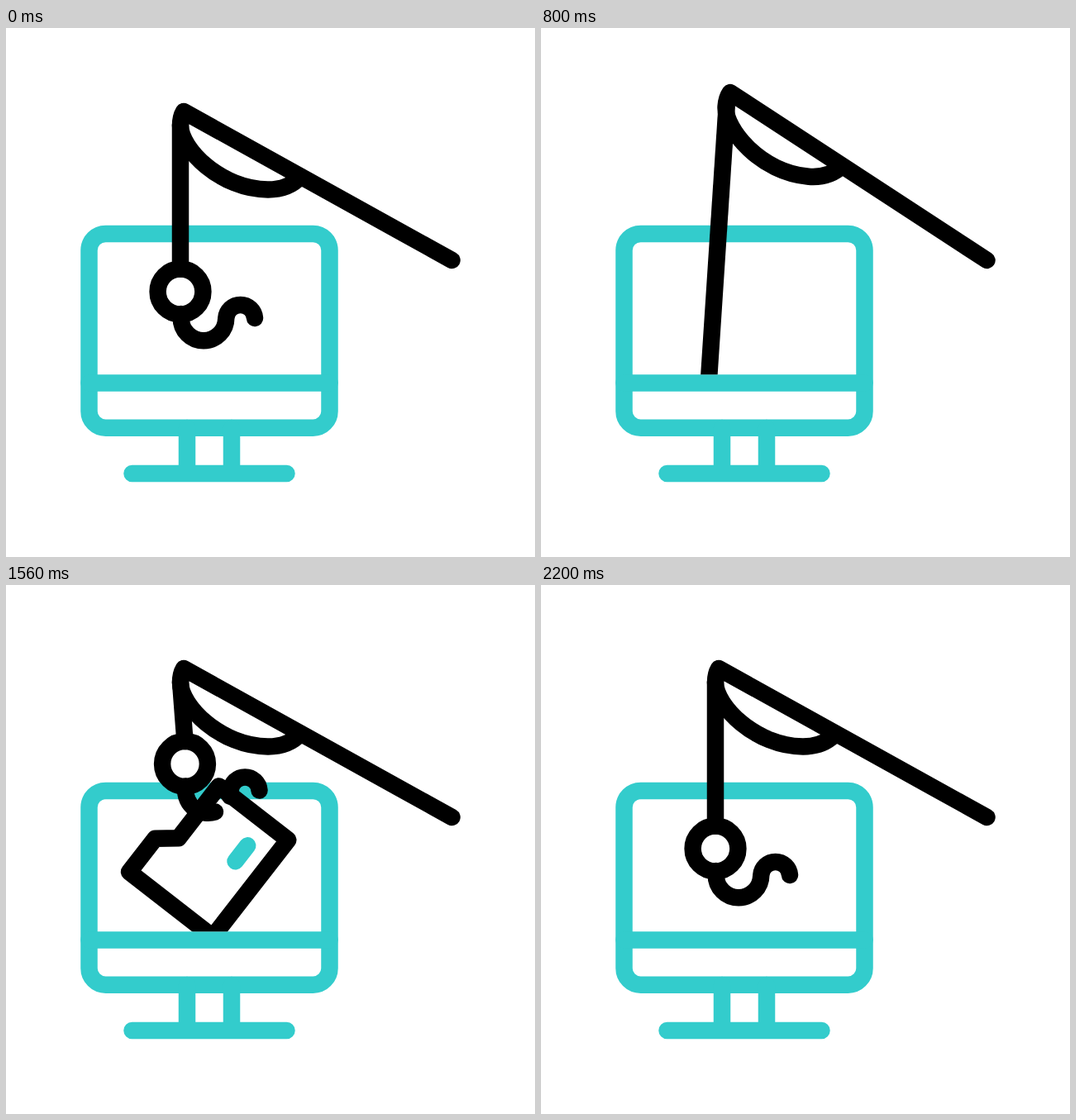
An HTML page for the animation above (2400 ms loop, 640 by 640 pixels).

```html
<!DOCTYPE html>
<html lang="en">
<head>
<meta charset="utf-8">
<title>Fishing rod and screen</title>
<style>
  html, body { margin: 0; width: 100%; height: 100%; overflow: hidden; background: #fff; }
  svg { display: block; width: 100vw; height: 100vh; }
  g { fill: none; stroke: #000; stroke-width: 20.5; stroke-linecap: round; stroke-linejoin: round; }
  .teal { stroke: #3cc; }
</style>
</head>
<body>
<svg viewBox="0 0 640 640">
  <clipPath id="water"><path d="M0 0H640V419.3H0Z"/></clipPath>
  <g class="teal">
    <rect x="100.5" y="249" width="291" height="234.7" rx="20"/>
    <path d="M100.5 429.5H391.5M219 484V539M273 484V539M152.5 539H339.5"/>
  </g>
  <g clip-path="url(#water)">
    <path id="line"/>
    <g id="card">
      <path d="M0 0H106V148.5H-22V97.5L0 79.5Z"/>
      <path class="teal" d="M71.5 35.5V59.5"/>
    </g>
    <g id="hook">
      <circle r="27.4"/>
      <path id="barb" d="M.7 27V32A27.3 27.3 0 0 0 55.3 32A17.4 17.4 0 0 1 90 32"/>
      <path id="pierced" d="M.7 27V32A27.3 27.3 0 0 0 36.4 58M54.4 39A27.3 27.3 0 0 0 55.3 32A17.4 17.4 0 0 1 90 32"/>
    </g>
  </g>
  <g id="rod">
    <path d="M539.5 281L215 101C212 106 211 112 211 118C211 146 260 195.5 317 195.5C334 195.5 347 190 356 180"/>
  </g>
</svg>
<script>
const LOOP = 2400, STEP = 20, RAD = Math.PI / 180;
const CATCH = 900, RELEASE = 1860, END = 2200;
const el = id => document.getElementById(id);
const place = (id, transform) => el(id).setAttribute('transform', transform);
const show = (id, on) => el(id).style.display = on ? '' : 'none';

// Eased progress from 0 to 1 between two times.
function phase(t, from, to) {
  const x = Math.min(1, Math.max(0, (t - from) / (to - from)));
  return (1 - Math.cos(Math.PI * x)) / 2;
}

function turn(x, y, deg) {
  const c = Math.cos(deg * RAD), s = Math.sin(deg * RAD);
  return [x * c - y * s, x * s + y * c];
}

function draw(t) {
  const dip = phase(t, 200, 600), drift = phase(t, 600, CATCH);
  const raise = phase(t, CATCH, 1300), sway = phase(t, 1300, 1700);
  const sink = phase(t, 1700, END);

  const lift = 4.35 * (phase(t, 200, CATCH) - raise);
  place('rod', `rotate(${lift} 539.5 281)`);

  const x = 211 - 67 * dip + 75.3 * drift - 2.8 * raise - 5.5 * sink;
  const y = 319 + 152.5 * dip - 6.5 * drift - 248.5 * raise + 102.5 * sink;
  const tilt = 4.5 * (drift - raise);
  place('hook', `translate(${x} ${y}) rotate(${tilt})`);
  const caught = t >= CATCH && t < RELEASE;
  show('pierced', caught);
  show('barb', !caught);

  // The line runs from the rod tip, which gives a little, to the top of the ring.
  const [tx, ty] = turn(211 - 539.5, 117 - 281, lift);
  const [rx, ry] = turn(0, -27.4, tilt);
  const give = 4 * (dip - drift);
  el('line').setAttribute('d', `M${539.5 + tx + give} ${281 + ty + give}L${x + rx} ${y + ry}`);

  // The card swings from the barb, then slips off it.
  const swing = 81 - 51.5 * raise + 11.5 * sway - 20 * sink;
  show('card', t >= CATCH && t < END);
  place('card', `translate(${x + 36.7} ${y + 51.1 + 115 * sink}) rotate(${swing}) translate(-11.4 -21.8)`);
}

const start = performance.now();
function tick() {
  const t = (performance.now() - start) % LOOP;
  draw(Math.floor(t / STEP) * STEP);
  requestAnimationFrame(tick);
}
tick();
</script>
</body>
</html>
```
